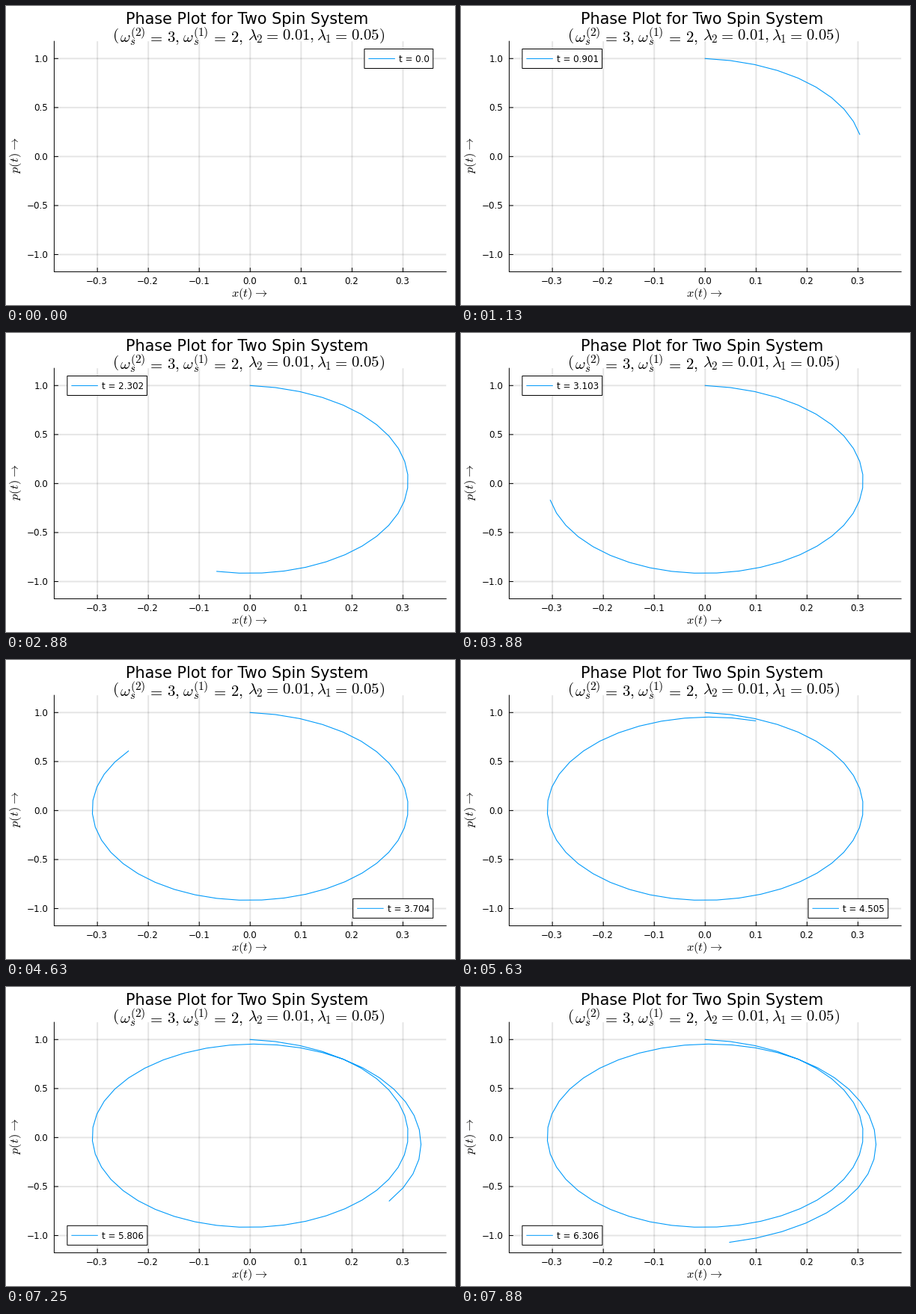
A matplotlib script for the animation above (8000 ms loop, 600x400 px).

```python
import numpy as np
import matplotlib.pyplot as plt
from matplotlib.animation import FuncAnimation
from matplotlib.patches import Rectangle
from matplotlib.textpath import TextPath

plt.rcParams["font.family"] = "DejaVu Sans"
plt.rcParams["mathtext.fontset"] = "cm"
plt.rcParams["path.snap"] = False

W, H, DPI = 600, 400, 100
PX = 72 / DPI  # points per pixel
FRAMES, INTERVAL = 64, 125
BLUE = "#009AFA"
TITLE, LABEL, SMALL = 20.8, 16.4, 11.9  # font sizes in pixels
LEFT, RIGHT, TOP, BOTTOM = 64.4, 588.2, 47.2, 355.6
GAP_X, GAP_Y = (RIGHT - LEFT) / 30, (BOTTOM - TOP) / 30  # legend to axes
BOX_H = 26

fig = plt.figure(figsize=(W / DPI, H / DPI), dpi=DPI, facecolor="white")
ax = fig.add_axes([0, 0, 1, 1])
ax.set(xlim=(0, W), ylim=(H, 0))
ax.axis("off")


def to_x(v):
    return 326.3 + 680.6 * v


def to_y(v):
    return 201.4 - 131.1 * v


def stroke(xs, ys, width=1, color="black", **kw):
    return ax.plot(xs, ys, color=color, lw=width * PX, **kw)[0]


def write(x, y, s, size, ha="left", **kw):
    return ax.text(x, y, s, fontsize=size * PX, ha=ha, va="baseline", **kw)


def number(v):
    return f"{v:.1f}".replace("-", "\u2212")


def draw_axes():
    grid = dict(width=2, alpha=0.1, solid_capstyle="butt")
    for v in np.arange(-3, 4) / 10:
        x = to_x(v)
        stroke([x, x], [TOP, BOTTOM], **grid)
        stroke([x, x], [BOTTOM, BOTTOM - 5])
        write(x - 0.5, 372, number(v), SMALL, "center")
    for v in np.arange(-2, 3) / 2:
        y = to_y(v)
        stroke([LEFT, RIGHT], [y, y], **grid)
        stroke([LEFT, LEFT + 5], [y, y])
        write(56.3, y + 4.5, number(v), SMALL, "right")
    stroke([LEFT, LEFT, RIGHT], [TOP, BOTTOM, BOTTOM])

    write(301, 389, "$x(t)$", LABEL)
    write(340.5, 389, r"$\rightarrow$", LABEL, "center")
    up = dict(rotation=90, rotation_mode="anchor")
    write(17, 224.5, "$p(t)$", LABEL, **up)
    write(17, 184.5, r"$\rightarrow$", LABEL, "center", **up)


def draw_title():
    write(160, 24, "Phase Plot for Two Spin System", TITLE)
    write(142, 45, "$($", TITLE)
    for x, spin, value in ((152, 2, 3), (236.5, 1, 2)):
        write(x, 48, r"$\omega$", TITLE)
        write(x + 14, 40, f"$({spin})$", 15.6)
        write(x + 13, 52, "$s$", 14.6)
        write(x + 47.5, 48, "$=$", TITLE, "center")
        write(x + 63, 48, f"${value},$", TITLE)
    for x, index, value in ((323, 2, "0.01,"), (415, 1, "0.05")):
        write(x, 45.4, r"$\lambda$", TITLE)
        write(x + 11, 48.6, f"${index}$", 15)
        write(x + 31, 45.4, "$=$", TITLE, "center")
        write(x + 46, 45.4, f"${value}$", TITLE)
    write(498.5, 45, "$)$", TITLE)


def trajectory():
    """Oscillator driven at both spin frequencies, fitted to waypoints."""
    way = np.array([
        (326.3, 70.3), (423, 86.3), (495, 122.5), (533, 172),
        (532.5, 224.5), (495, 272), (428, 306), (342, 321.3),
        (252.5, 314), (176.5, 285.5), (127.5, 241.5), (116, 187.5),
        (146, 136.5), (210, 97.5), (299, 77.7), (394, 81.5),
        (476, 108), (534.5, 153.5), (554, 211), (531, 268.5),
        (460.5, 316), (359, 341.5)])
    s = times / times[-1]
    terms = [np.ones(FRAMES)]
    for freq in (1.465, 2, 3):
        for wave in (np.cos(freq * times), np.sin(freq * times)):
            terms += [wave, s * wave]
    basis = np.stack(terms, axis=1)
    coef = np.linalg.lstsq(basis[::3], way, rcond=None)[0]
    return basis @ coef


times = np.arange(FRAMES) * 100 / 999
path = trajectory()

draw_axes()
draw_title()
curve = stroke([], [], 1.1, BLUE, zorder=3)
frame = ax.add_patch(Rectangle((0, 0), 1, BOX_H, fc="white", ec="black",
                               lw=PX, zorder=4))
sample = stroke([], [], 1, BLUE, zorder=5)
caption = write(0, 0, "", SMALL, zorder=5)


def corner(i):
    """Legend corner that stays clear of the curve: (on the right, top y)."""
    top, bottom = TOP + GAP_Y, BOTTOM - GAP_Y - BOX_H
    if i < 5:
        return True, top
    if i < 37:
        return False, top
    return i < 58, bottom


def update(i):
    curve.set_data(path[:i + 1, 0], path[:i + 1, 1])
    label = f"t = {round(float(times[i]), 3)}"
    width = 51.5 + TextPath((0, 0), label, size=SMALL).get_extents().x1
    on_right, y = corner(i)
    x = RIGHT - GAP_X - width if on_right else LEFT + GAP_X
    frame.set_xy((x, y))
    frame.set_width(width)
    sample.set_data([x + 6, x + 40.5], [y + 13, y + 13])
    caption.set_position((x + 46.2, y + 17.5))
    caption.set_text(label)
    return curve, frame, sample, caption


anim = FuncAnimation(fig, update, frames=FRAMES, interval=INTERVAL,
                     repeat=True, repeat_delay=0)
plt.show()
```
